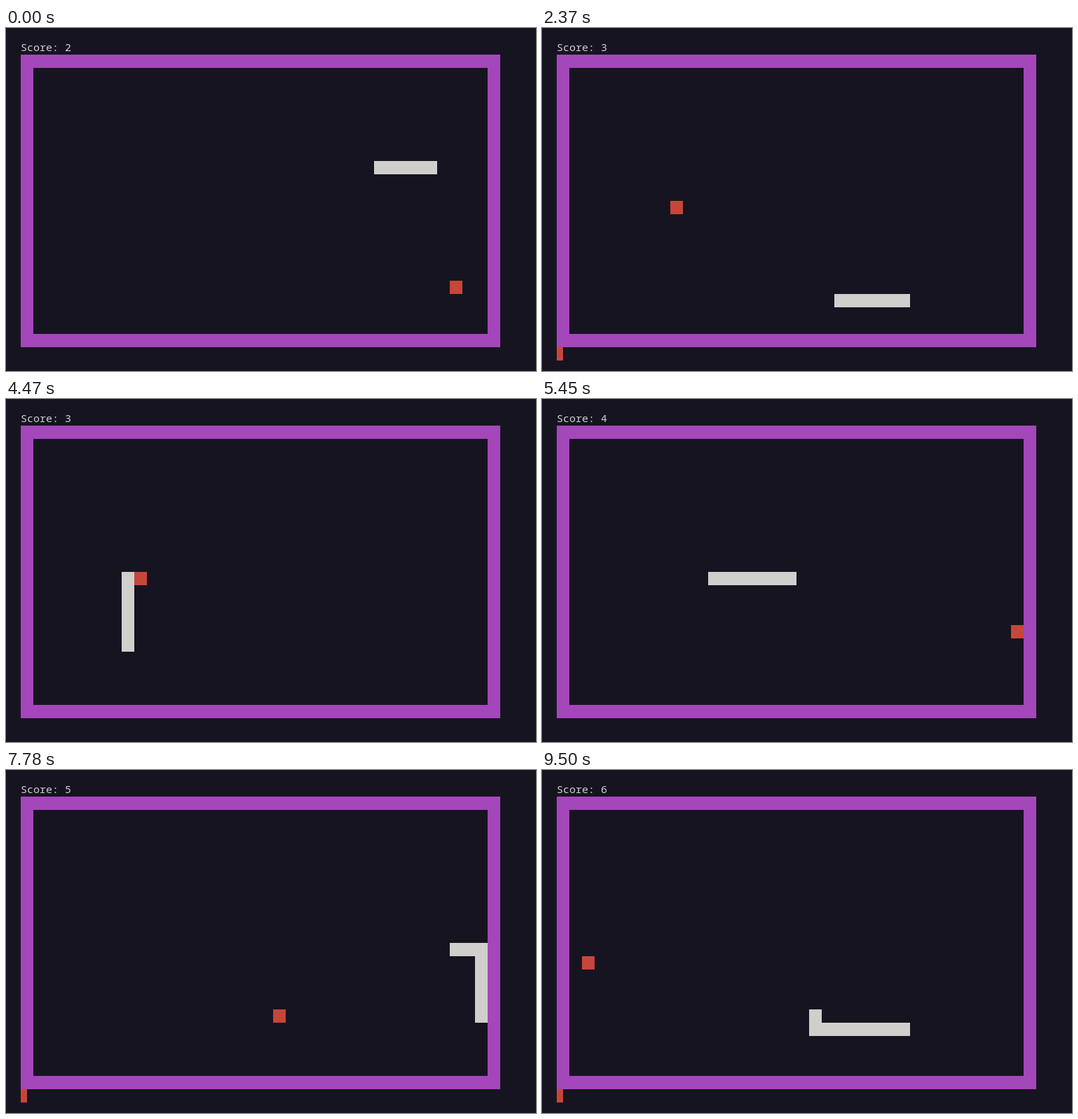
An HTML page that plays this animation: 756 by 490 pixels, repeating every 9530 ms.

```html
<!DOCTYPE html>
<html lang="en">
<head>
<meta charset="utf-8">
<title>Snake</title>
<style>
  html, body { margin: 0; width: 100%; height: 100%; overflow: hidden; background: #171421; }
  svg { display: block; }
  text { font: 15px "Noto Sans Mono", "DejaVu Sans Mono", monospace; fill: #d0cfcc; white-space: pre; }
</style>
</head>
<body>
<svg width="756" height="490" viewBox="0 0 756 490" shape-rendering="crispEdges">
  <rect width="756" height="490" fill="#171421"/>
  <text id="score" x="21" y="33"></text>
  <path fill="#a347ba" fill-rule="evenodd" d="M21 38h684v418h-684zM39 57h648v380h-648z"/>
  <path id="food" fill="#c6463a"/>
  <path id="snake" fill="#d0cfcc"/>
  <rect id="cursor" x="21" y="456" width="9" height="19" fill="#c6463a"/>
</svg>
<script>
const LOOP = 9530, STEP = 99, LEAD = 8;
const BLINK = 550, BLINK_START = 80, LAST_BLINK = 16;
const LENGTH = 5, SCORE = 2;
const TAIL = [28, 8];
const RUNS = [6, 10, -26, -7, 28, 6, -16, -1]; // across, down, across, ...
const MEALS = [11, 46, 77, 96];                // steps on which the snake eats
const LAST_FOOD = [2, 12];

const $ = id => document.getElementById(id);
const cell = ([col, row]) => `M${21 + col * 18} ${38 + row * 19}h18v19h-18z`;

// Every cell the head visits
const route = [TAIL];
RUNS.forEach((run, i) => {
  for (let n = Math.abs(run); n > 0; n--) {
    const next = [...route[route.length - 1]];
    next[i % 2] += Math.sign(run);
    route.push(next);
  }
});
const foods = [...MEALS.map(step => route[step + LENGTH - 1]), LAST_FOOD];

function draw(t) {
  const step = Math.floor((t + LEAD) / STEP);
  const eaten = MEALS.filter(meal => meal <= step).length;
  const body = route.slice(step - eaten, step + LENGTH);
  $("score").textContent = `Score: ${SCORE + eaten}`;
  $("food").setAttribute("d", cell(foods[eaten]));
  $("snake").setAttribute("d", body.map(cell).join(""));
  const blink = Math.min(Math.floor((t - BLINK_START) / BLINK), LAST_BLINK);
  $("cursor").setAttribute("visibility", blink % 2 ? "hidden" : "visible");
}

const begin = performance.now();
function tick() {
  draw((performance.now() - begin) % LOOP);
  requestAnimationFrame(tick);
}
tick();
</script>
</body>
</html>
```
